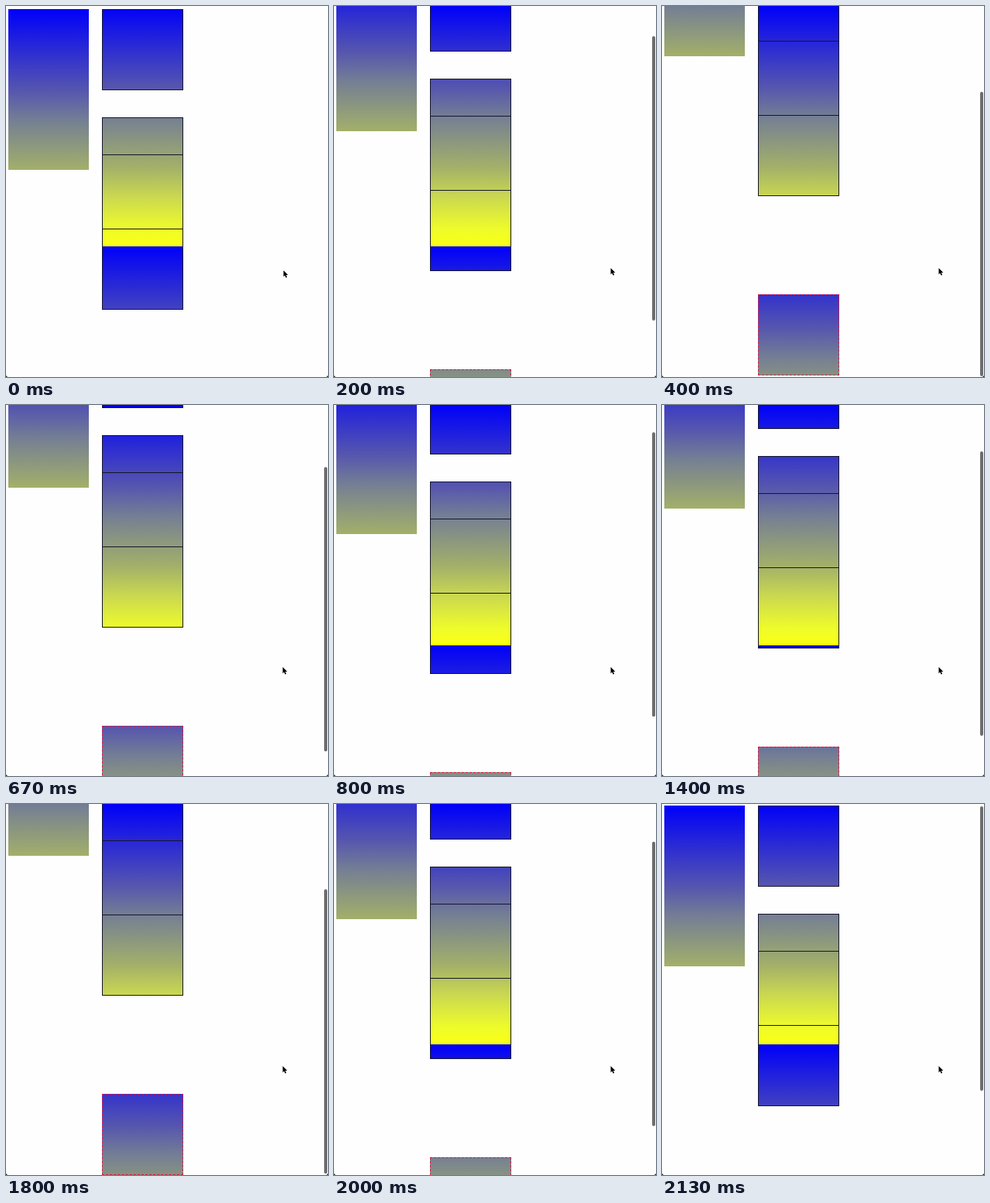
Write an HTML page that moves like this. It is 416 by 480 pixels and loops after 2.19 s.

```html
<!DOCTYPE html>
<html lang="en">
<head>
<meta charset="utf-8">
<title>Fixed gradient scroll</title>
<style>
  html, body { margin: 0; width: 100%; height: 100%; overflow: hidden; background: #fefefe; }
  #stage { position: relative; width: 416px; height: 480px; overflow: hidden; --s: 0; --o: 0; }
  #page { position: absolute; inset: 0; transform: translateY(calc(var(--s) * -1px)); }
  #page div {
    position: absolute; box-sizing: border-box;
    top: calc(var(--y) * 1px); height: calc(var(--h) * 1px);
    background: linear-gradient(#0000fa, #5656ae 34%, #747e94 46%, #a3b069 67%, #c9d751 79%, #effc2a 93%, #fbff14) 0 0 / 100% 311px;
    background-origin: border-box;
  }
  #page .local { left: 3px; width: 104px; }
  #page .fixed {
    left: 124px; width: 105px; border: 1px solid #15152a;
    background-position-y: calc((var(--o) + var(--s) - var(--y)) * 1px);
  }
  #page .dashed { border: 1px dashed #e0143f; }
  #page .rule { left: 124px; width: 105px; background: #15152a; }
  #thumb { position: absolute; left: 411px; top: 0; width: 4px; height: 368px; border-radius: 2px; background: #6d6d6d; }
  #cursor { position: absolute; left: 0; top: 0; overflow: visible; }
  .corner { position: absolute; bottom: 0; width: 2px; height: 2px; }
  .corner.l { left: 0; background: linear-gradient(45deg, #222 40%, transparent 60%); }
  .corner.r { right: 0; background: linear-gradient(-45deg, #222 40%, transparent 60%); }
</style>
</head>
<body>
<div id="stage">
  <div id="page">
    <div class="local" style="--y:4;--h:208"></div>
    <div class="fixed" style="--y:4;--h:105"></div>
    <div class="fixed" style="--y:144;--h:249"></div>
    <div class="rule" style="--y:192;--h:1"></div>
    <div class="rule" style="--y:288;--h:1"></div>
    <div class="fixed dashed" style="--y:520;--h:105"></div>
  </div>
  <div id="thumb"></div>
  <svg id="cursor" width="8" height="11">
    <path d="M0 0V8.2L1.8 6.6L3 9.6L4.6 8.9L3.3 6H5.8Z" fill="#000" stroke="#fff" stroke-width=".8" paint-order="stroke"/>
  </svg>
  <i class="corner l"></i><i class="corner r"></i>
</div>
<script>
  const LOOP = 2190;
  const stage = document.getElementById('stage');
  const thumb = document.getElementById('thumb');
  const cursor = document.getElementById('cursor');

  // Scroll gesture: [step, offset]
  const knots = [[0, 0], [3, 50], [6, 147], [8, 146], [10, 105], [13, 20], [16, -5],
                 [18, 5], [21, 78], [25, 146], [27, 145], [30, 63], [32, 2]];
  const last = knots.length - 1;

  function slope(i) {
    if (i === 0 || i === last) return 0;
    const a = knots[i - 1], b = knots[i + 1];
    return (b[1] - a[1]) / (b[0] - a[0]);
  }

  function scrollAt(k) {
    let i = 0;
    while (i < last - 1 && k >= knots[i + 1][0]) i++;
    const [x0, y0] = knots[i], [x1, y1] = knots[i + 1];
    const d = x1 - x0, u = (k - x0) / d, v = 1 - u;
    const y = y0 * v * v * (1 + 2 * u) + y1 * u * u * (3 - 2 * u)
            + d * u * v * (v * slope(i) - u * slope(i + 1));
    return Math.round(Math.min(148, y));
  }

  const startOf = k => Math.round(k * 20 / 3) * 10;

  function stepAt(t) {
    let k = Math.min(32, Math.ceil(t * 0.015));
    while (k > 0 && startOf(k) > t) k--;
    return k;
  }

  function draw(now) {
    const k = stepAt(now % LOOP);
    const s = scrollAt(k);
    stage.style.setProperty('--s', s);
    stage.style.setProperty('--o', Math.max(0, -s));
    thumb.style.visibility = k ? 'visible' : 'hidden';
    thumb.style.transform = `translateY(${Math.max(1, Math.min(111, 1.5 + s * 0.75))}px)`;
    cursor.style.transform = k ? 'translate(357.5px, 339px)' : 'translate(358.5px, 342px)';
  }

  const begin = performance.now();
  function tick() {
    draw(performance.now() - begin);
    requestAnimationFrame(tick);
  }
  tick();
</script>
</body>
</html>
```
